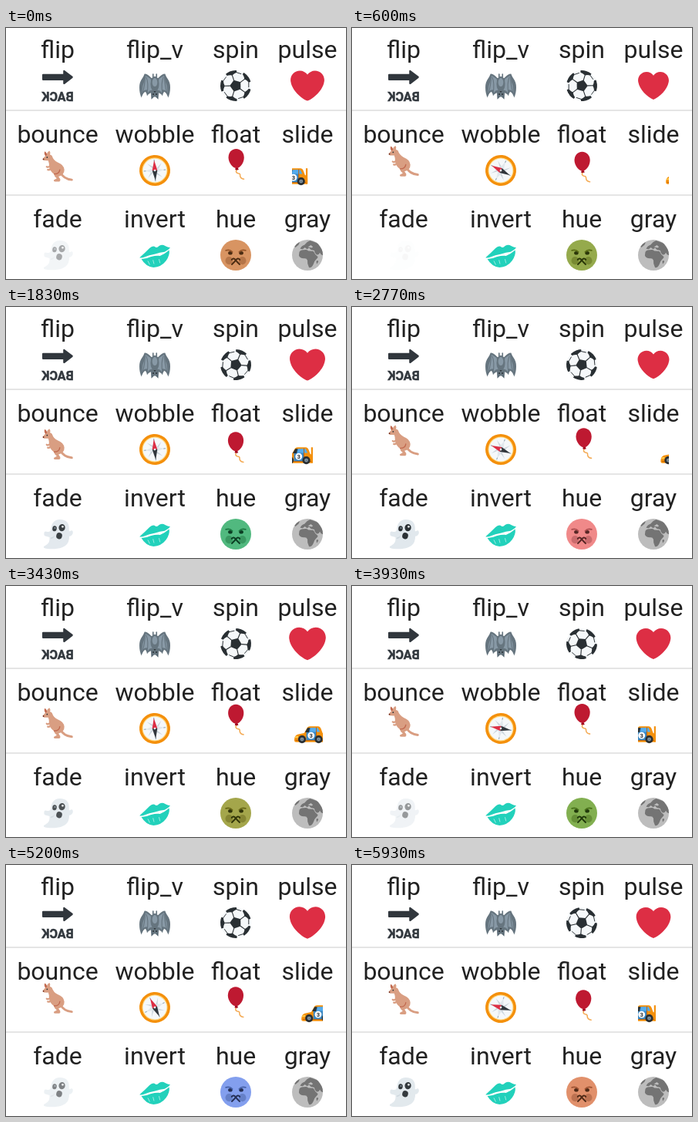
These frames come from a looping animation (441 by 326 pixels, 5960 ms). An HTML page:

```html
<!DOCTYPE html>
<html lang="en">
<head>
<meta charset="utf-8">
<style>
  html, body { margin: 0; width: 100%; height: 100%; overflow: hidden; background: #fff; }
  svg { display: block; width: 441px; height: 326px; }
  .label { font: 32px Roboto, sans-serif; fill: #212121; text-anchor: middle; }
  .bold { font-family: Roboto, sans-serif; font-weight: 700; text-anchor: middle; }
</style>
</head>
<body>
<svg id="stage" viewBox="0 0 441 326">
  <clipPath id="box"><path d="M0 0H36V36H0z"/></clipPath>
  <clipPath id="disc"><circle cx="18" cy="18" r="18"/></clipPath>
  <path d="M0 106H441V108H0zM0 216H441V218H0z" fill="#e5e5e5"/>
</svg>
<script>
const fill = (color, d) => `<path fill="${color}" d="${d}"/>`;
const line = (color, width, d) =>
  `<path fill="none" stroke="${color}" stroke-width="${width}" stroke-linecap="round" stroke-linejoin="round" d="${d}"/>`;
const oval = (color, x, y, rx, ry = rx, turn = 0) =>
  `<ellipse fill="${color}" cx="${x}" cy="${y}" rx="${rx}" ry="${ry}" transform="rotate(${turn} ${x} ${y})"/>`;
const mirror = art => art + `<g transform="translate(36) scale(-1 1)">${art}</g>`;
const around = (count, art) => Array.from({ length: count }, (_, i) =>
  `<g transform="rotate(${i * 360 / count} 18 18)">${art}</g>`).join('');

const dark = '#292f33';

// Every drawing lives in a 36 x 36 box.
const art = {
  flip: fill('#31373d', 'M1 4.2H24.5V1Q24.5-.6 26-.1L35.3 7Q36.6 8 35.3 9L26 16.1Q24.5 16.6 24.5 15V11.8H1Q0 11.8 0 10.8V5.2Q0 4.2 1 4.2z') +
    `<text class="bold" font-size="14.4" fill="#31373d" stroke="#31373d" stroke-width=".4" transform="translate(18 35.8) scale(-1 1)">BACK</text>`,

  flip_v: mirror(
      fill('#66757f', 'M18 8L14 9Q10 4 6 4Q5 7 3 10Q0 14 0 20Q0 27 2.5 32Q3.5 27 7 25Q9 27 9 30Q12 25 18 26z') +
      fill('#8899a6', 'M13 10Q9 7 7 6Q6 13 4 18L3 26Q6 22 9 23L10 26Q12 23 16 23z') +
      line('#66757f', 1, 'M6.5 6Q7 16 3 29M8 8Q11 15 9 27')) +
    oval('#66757f', 18, 16, 5, 9) + oval('#8899a6', 18, 14, 3, 5) +
    mirror(fill('#546570', 'M13.5 26L14 34L18 30z') + line('#66757f', 1.5, 'M16 8V4.5')) +
    oval('#66757f', 18, 27, 4.6, 4) + mirror(oval(dark, 16.2, 28, .9)) + oval(dark, 18, 25, 1.2, .7),

  spin: `<g clip-path="url(#disc)">` + oval('#f5f8fa', 18, 18, 18) +
    fill(dark, 'M18 11L24.66 15.84L22.12 23.66H13.88L11.34 15.84z') +
    around(5, line(dark, 1, 'M18 11V5') +
      fill(dark, 'M18 5.2Q21 3.6 24 3.6L25.5-2H10.5L12 3.6Q15 3.6 18 5.2z') +
      line(dark, .8, 'M24 3.6L28.3 6.8')) + `</g>`,

  pulse: fill('#dd2e44', 'M35.885 11.833c0-5.45-4.418-9.868-9.867-9.868-3.308 0-6.227 1.633-8.018 4.129-1.791-2.496-4.71-4.129-8.017-4.129-5.45 0-9.868 4.417-9.868 9.868 0 .772.098 1.52.266 2.241C1.751 22.587 11.216 31.568 18 34.034c6.783-2.466 16.249-11.447 17.617-19.959.17-.721.268-1.469.268-2.242z'),

  bounce: line('#d99e82', 2.6, 'M21 25Q25 33 34.5 33.8') +
    fill('#c1694f', 'M3 .5Q1.6 3 4 6.5L6 6Q5.5 2 3 .5z') +
    fill('#d99e82', 'M8.5 0Q5.3 1.5 5.3 5Q2.6 6 .8 9Q.2 10.8 2 11.2Q5 11.4 7 11.3Q8.2 14 8 18Q9 24 13.5 27Q14 30 17 32L13.5 34Q13 35.6 15 35.8H20Q21.5 35 21 33L19 30Q26 28 25.8 22Q25 16 18 13.5Q13 11 11.5 6Q10.5 4.5 9 4.5Q10 2 8.5 0z') +
    line('#c1694f', 1.2, 'M14 27Q20 27 20.5 22') +
    line('#d99e82', 2, 'M10 17Q7 20 5.2 18.5M11 19Q9 23 6.5 22') +
    oval(dark, 5.7, 7.5, .8) + oval('#662113', 1.4, 9.7, .8),

  wobble: oval('#f4900c', 18, 18, 18) + oval('#ffd983', 18, 18, 14.8) + oval('#f5f8fa', 18, 18, 13.8) +
    around(4, line('#99aab5', 1, 'M18 5.6V7.5') + fill('#ccd6dd', 'M18 18L15.8 15.8L9.5 9.5L20.2 15.8z')) +
    around(4, fill('#e1e8ed', 'M18 7L20.5 15.5L18 18L15.5 15.5z')) +
    fill('#dd2e44', 'M18 6L21 18H15z') + fill('#31373d', 'M18 30L15 18H21z') + oval('#f5f8fa', 18, 18, 1.2),

  float: line('#f4ab55', 1.4, 'M20 23.5Q17.5 27.5 21 28.5Q24 28.5 23.6 31.5Q24 34.5 28 35.2') +
    fill('#a0041e', 'M18.5 21.5L17.8 24.3Q20 25 22 24.2L20.7 21.5z') +
    fill('#be1931', 'M19 0C13.5 0 10 4.5 10 10C10 16 15 22.5 19.5 22.5C24 22 28.2 16 28.2 10C28.2 4.5 24.5 0 19 0z'),

  slide: fill('#f4900c', 'M34 15.5H36V34H34z') +
    fill('#f4900c', 'M0 32Q-.2 26.5 4 25L11.5 23.5L15 17Q16 15.6 18 15.6H28Q30 15.6 31 18L33 23.5Q36 24 36 28V33Q35 34 33 34H2Q0 34 0 32z') +
    fill('#3b88c3', 'M14 20L16 17.5H25.5V32.5H14z') +
    fill('#ffcc4d', 'M1 27.5L4.5 26.8V29H.7z') +
    fill(dark, 'M12.5 22.5L15.5 17.3H18.2L17 22.5z') + fill('#55acee', 'M19 17.3H27.5L30 22H18z') +
    line('#be5c00', .8, 'M2 32H34M25.7 17V32') +
    [9, 28.4].map(x => oval(dark, x, 30.7, 4.6) + oval('#8899a6', x, 30.7, 2.2) + oval('#66757f', x, 30.7, 1)).join('') +
    oval('#fff', 19.6, 26.2, 4) + `<text class="bold" font-size="6.8" x="19.6" y="28.6" fill="${dark}">3</text>`,

  fade: fill('#e1e8ed', 'M20.5.8C13.5.8 10.6 6 10.2 12Q9.8 16 6 15.3Q2.2 14 2.2 16.6Q1.6 20 4.2 20.5L8.5 21.5Q9 27 6.2 29.5Q3 32 1.8 32.5Q1 34.8 5.5 35C16 36 27 35 30.5 27Q31.6 24 31.6 20.5Q35 20 35.8 16.8Q36 13 33.4 14Q32 15 31.3 14.3Q32.6.8 20.5.8z') +
    fill('#ccd6dd', 'M10 22Q13 22 14.5 19Q14.2 23.5 9.5 23.5z') +
    oval(dark, 14.4, 11.5, 2.5, 3.1, 8) + oval(dark, 23, 10.5, 3.7, 4.2, 8) +
    oval('#f5f8fa', 23.8, 9.3, 1.2) + oval('#8899a6', 14.8, 10.8, .9) + oval(dark, 19.8, 20, 3.4, 3.7, 15),

  invert: fill('#22d1bb', 'M.2 21Q6 16 11.8 10Q15.5 6.2 19 8.7Q21 9.5 23 7.2Q27 4.8 30 7.3Q33 9.2 36 9.2Q33.5 12.5 29.5 14.2Q24 15 18.5 16.6Q11 18 6 20.2Q3 21.7.2 21z') +
    fill('#22d1bb', 'M2.3 22.4Q8 22.5 13 20Q19 18.5 24 18.8Q30 16.5 34.8 12.2Q35.8 18 31.2 24.5Q25.5 32 16.5 32.3Q7.5 31.5 2.3 22.4z') +
    line('#fff', .5, 'M10 25L12 29M16 24L17 28M23 23L24 27'),

  hue: oval('#77b255', 18, 18, 18) +
    mirror(oval('#5c913b', 10.2, 24.5, 4.3, 4.6) +
      oval('#1c3a0e', 11.6, 15.5, 2.5, 2.1) +
      line('#3e721d', 1.6, 'M6.5 12.5Q11 11 14 14.2') +
      line('#1c3a0e', 1.7, 'M18 24Q15.5 20.5 13.3 23.3M18 24Q16.5 26 13.5 28.8')) ,

  gray: oval('#bdbdbd', 18, 18, 18) + `<g clip-path="url(#disc)">` +
    fill('#747474', 'M8.5 14.5Q10 11.5 14 12Q17 11 19 13Q23 13.4 25 13.5Q26.5 17 29.5 19.3Q31 20 29 22Q25.7 25 25 28.5Q22.5 33.5 19.8 32.5Q17.5 28 18 24Q17 21.5 14.5 21.8Q9 22 8 18.5z') +
    fill('#747474', 'M9.5 10.5Q11 7 14.5 6Q17 2.5 21 1L30 4L36 13V18Q34 18.5 32.5 15Q31 18.2 28.8 17.5Q26 15.5 26 12.6L22 11.8L20 9.5L17.5 11L15 9L12.5 11z') +
    fill('#bdbdbd', 'M18.5 8.5L22 6.2L24.5 8.3L23 9.5L20 8.7z') +
    fill('#747474', 'M28.3 25Q31 23 30.5 26L28.8 28.5zM2 7Q5 4 9 3L7.5 6L4 9z') + `</g>`
};

const stage = document.getElementById('stage');
const columns = [67, 193, 298, 391];
const parts = {};
Object.keys(art).forEach((name, i) => {
  const x = columns[i % 4], y = 110 * Math.floor(i / 4);
  const clip = name === 'slide' ? 'clip-path="url(#box)"' : '';
  stage.insertAdjacentHTML('beforeend',
    `<text class="label" x="${x}" y="${y + 39}">${name}</text>
     <g transform="translate(${x - 20} ${y + 55}) scale(${10 / 9})" ${clip}><g id="${name}">${art[name]}</g></g>`);
  parts[name] = document.getElementById(name);
});

function bezier(x1, y1, x2, y2) {
  const at = (a, b, u) => 3 * a * u * (1 - u) ** 2 + 3 * b * u * u * (1 - u) + u ** 3;
  return x => {
    let low = 0, high = 1;
    for (let i = 0; i < 20; i++) {
      const mid = (low + high) / 2;
      if (at(x1, x2, mid) < x) low = mid; else high = mid;
    }
    return at(y1, y2, low);
  };
}
const ease = bezier(.25, .1, .25, 1);
const easeInOut = bezier(.42, 0, .58, 1);
const cycle = (time, period) => time % period / period;
const swing = (time, half) => 1 - Math.abs(1 - time % (2 * half) / half);
const wave = (time, period) => Math.sin(2 * Math.PI * time / period);

const loop = 5960, lead = 7495; // the motions are already under way when the loop begins

function draw(now) {
  const t = now % loop + lead;
  const move = (name, value) => parts[name].setAttribute('transform', value);
  const px = v => v * .9;

  move('spin', `rotate(${360 * cycle(t, 2000)} 18 18)`);
  move('pulse', `translate(18 18) scale(${1 + .2 * easeInOut(swing(t, 1000))}) translate(-18 -18)`);
  move('bounce', `translate(0 ${px(-12.5 * ease(1 - swing(t, 400)))})`);
  move('wobble', `rotate(${-45 - 45 * wave(t, 1600)} 18 18)`);
  move('float', `translate(${px(1.4 * wave(t + 117, 5000 / 3))} ${px(-7 - 5 * wave(t - 150, 5000))})`);
  move('slide', `translate(${36 - 72 * cycle(t, 2000)})`);
  parts.fade.style.opacity = ease(swing(t, 2000));
  parts.hue.style.filter = `hue-rotate(${360 * ease(cycle(t, 3000))}deg)`;
}

function frame() {
  draw(performance.now());
  requestAnimationFrame(frame);
}
frame();
</script>
</body>
</html>
```
